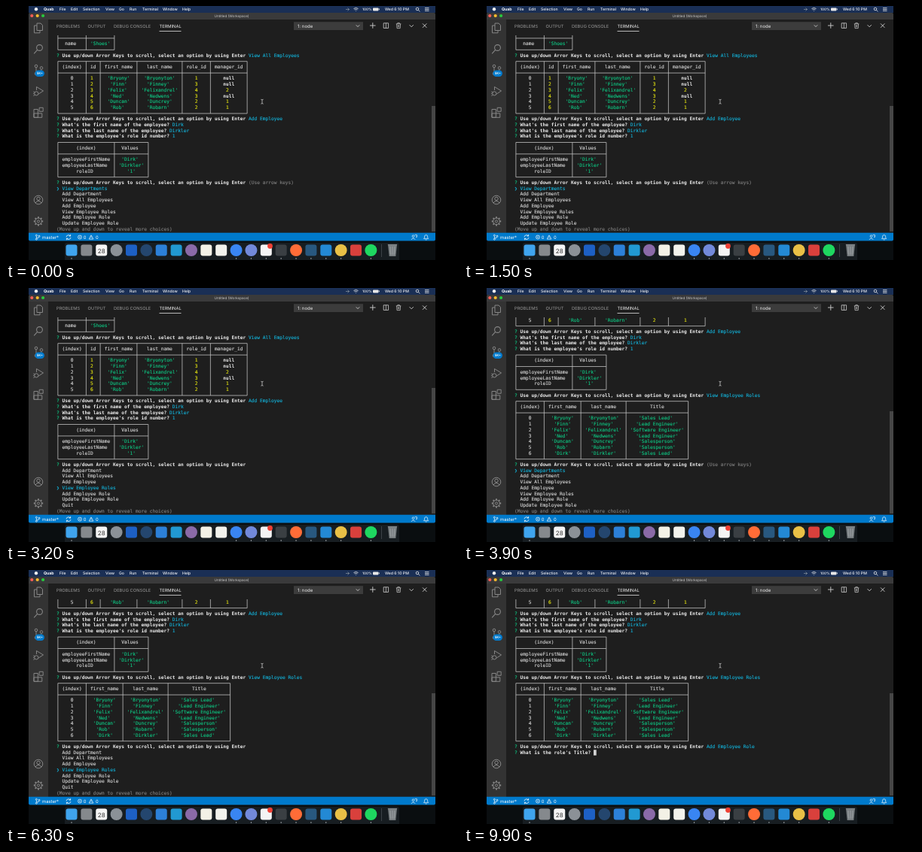
These frames come from a looping animation (600 by 338 pixels, 10000 ms). An HTML page with a canvas:

```html
<!DOCTYPE html>
<html lang="en">
<head>
<meta charset="utf-8">
<title>Employee terminal</title>
<style>
html, body { margin: 0; width: 100%; height: 100%; overflow: hidden; background: #000; }
canvas { display: block; width: 600px; height: 338px; }
</style>
</head>
<body>
<canvas id="stage" width="600" height="338"></canvas>
<script>
const ctx = document.getElementById('stage').getContext('2d');
ctx.textRendering = 'geometricPrecision';

const LOOP = 10000;
const CELL = 3.75, LINE = 7.7, LEFT = 67, FIRST_ROW = 42.9;
const MONO = '"DejaVu Sans Mono", monospace';
const SANS = 'Inter, sans-serif';
const PLAIN = '#d2d2d2', WHITE = '#ececec', GREEN = '#0fc481', CYAN = '#14aed4',
      YELLOW = '#e5e510', DIM = '#7d7d7d', ICON = '#858585';

const CHOICES = ['View Departments', 'Add Department', 'View All Employees', 'Add Employee',
  'View Employee Roles', 'Add Employee Role', 'Update Employee Role', 'Quit'];
const PAGE = 7;

const PEOPLE = [
  ['Bryony', 'Bryonyton', 1, null, 'Sales Lead'],
  ['Finn', 'Finney', 3, null, 'Lead Engineer'],
  ['Felix', 'Felixandrel', 4, 2, 'Software Engineer'],
  ['Ned', 'Nedwens', 3, null, 'Lead Engineer'],
  ['Duncan', 'Duncrey', 2, 1, 'Salesperson'],
  ['Rob', 'Robarn', 2, 1, 'Salesperson'],
  ['Dirk', 'Dirkler', 1, null, 'Sales Lead']
];
const quote = s => `'${s}'`;

const SHOES = [['(index)', 'Values'], ['name', quote('Shoes')]];
const EMPLOYEES = [['(index)', 'id', 'first_name', 'last_name', 'role_id', 'manager_id'],
  ...PEOPLE.slice(0, 6).map(([a, b, role, boss], i) => [i, i + 1, quote(a), quote(b), role, boss])];
const ANSWERS = [['(index)', 'Values'], ['employeeFirstName', quote('Dirk')],
  ['employeeLastName', quote('Dirkler')], ['roleID', quote(1)]];
const ROLES = [['(index)', 'first_name', 'last_name', 'Title'],
  ...PEOPLE.map(([a, b, , , title], i) => [i, quote(a), quote(b), quote(title)])];

// Each step: start time, menu number, and selected choice or input stage.
const STEPS = [
  { at: 0, menu: 1, pick: 0, hint: true },
  { at: 1800, menu: 1, pick: 1 },
  { at: 2000, menu: 1, pick: 2 },
  { at: 2200, menu: 1, pick: 3 },
  { at: 2400, menu: 1, pick: 4 },
  { at: 3900, menu: 2, pick: 0, hint: true },
  { at: 4800, menu: 2, pick: 1 },
  { at: 5100, menu: 2, pick: 2 },
  { at: 5600, menu: 2, pick: 3 },
  { at: 5900, menu: 2, pick: 4 },
  { at: 6900, menu: 2, pick: 5 },
  { at: 7900, menu: 2, input: 'wait' },
  { at: 8200, menu: 2, input: 'ask' }
];

function rect(x, y, w, h, color, radius = 0) {
  ctx.fillStyle = color;
  ctx.beginPath();
  ctx.roundRect(x, y, w, h, radius);
  ctx.fill();
}
function disc(x, y, r, color) {
  ctx.fillStyle = color;
  ctx.beginPath();
  ctx.arc(x, y, r, 0, 7);
  ctx.fill();
}
function stroke(d, color = ICON, width = 1) {
  ctx.strokeStyle = color;
  ctx.lineWidth = width;
  ctx.stroke(new Path2D(d));
}
const ring = (x, y, r) => `M${x + r} ${y}a${r} ${r} 0 1 0 ${-2 * r} 0a${r} ${r} 0 1 0 ${2 * r} 0`;
function label(text, x, y, size, color, weight = 400, align = 'left') {
  ctx.font = `${weight} ${size}px ${SANS}`;
  ctx.textAlign = align;
  ctx.textBaseline = 'middle';
  ctx.fillStyle = color;
  ctx.fillText(text, x, y);
}

const colX = col => LEFT + col * CELL;
const rowY = row => FIRST_ROW + row * LINE;

// Writes on the terminal grid and returns the following column.
function write(text, col, row, color = PLAIN, bold = false) {
  ctx.font = `${bold ? 'bold ' : ''}${CELL / 0.602}px ${MONO}`;
  ctx.textAlign = 'left';
  ctx.textBaseline = 'middle';
  ctx.fillStyle = ctx.strokeStyle = color;
  ctx.lineWidth = 0.15;
  [...text].forEach((ch, i) => {
    ctx.fillText(ch, colX(col + i), rowY(row));
    if (!bold) ctx.strokeText(ch, colX(col + i), rowY(row));
  });
  return col + text.length;
}
function ask(question, row, answer = '', color = CYAN) {
  write('?', 0, row, GREEN);
  const end = write(question, 2, row, WHITE, true);
  return write(answer, end + 1, row, color);
}
const menuPrompt = (row, answer, color) =>
  ask('Use up/down Arror Keys to scroll, select an option by using Enter', row, answer, color);

function cellColor(value, isIndex) {
  if (isIndex) return PLAIN;
  if (value === null) return WHITE;
  return typeof value === 'number' ? YELLOW : GREEN;
}
function table(data, top) {
  const widths = data[0].map((_, c) => 2 + Math.max(...data.map(r => String(r[c]).length)));
  const edges = [0];
  widths.forEach(w => edges.push(edges.at(-1) + w + 1));
  const bottom = top + data.length + 2;
  const mid = col => colX(col + 0.5);
  let d = '';
  for (const row of [top, top + 2, bottom]) d += `M${mid(0)} ${rowY(row)}H${mid(edges.at(-1))}`;
  for (const col of edges) d += `M${mid(col)} ${rowY(top)}V${rowY(bottom)}`;
  stroke(d, '#c8c8c8', 0.75);
  data.forEach((cells, r) => cells.forEach((value, c) => {
    const text = String(value);
    const col = edges[c] + 1 + Math.floor((widths[c] - text.length) / 2);
    const color = r ? cellColor(value, c === 0) : PLAIN;
    write(text, col, top + 1 + r + (r ? 1 : 0), color, value === null);
  }));
}
function menu(row, { pick, hint }) {
  menuPrompt(row, hint ? '(Use arrow keys)' : '', DIM);
  const first = Math.min(Math.max(pick - 3, 0), CHOICES.length - PAGE);
  for (let i = 0; i < PAGE; i++) {
    const chosen = first + i === pick;
    if (chosen) write('❯', 0, row + 1 + i, CYAN);
    write(CHOICES[first + i], 2, row + 1 + i, chosen ? CYAN : PLAIN);
  }
  write('(Move up and down to reveal more choices)', 0, row + 1 + PAGE, DIM);
}

function terminal(step) {
  const second = step.menu === 2;
  ctx.save();
  ctx.beginPath();
  ctx.rect(56, 39, 514, 262);
  ctx.clip();
  ctx.translate(0, second ? -12 * LINE : 0);
  table(SHOES, -2);
  menuPrompt(3, CHOICES[2]);
  table(EMPLOYEES, 4);
  menuPrompt(14, CHOICES[3]);
  ask("What's the first name of the employee?", 15, 'Dirk');
  ask("What's the last name of the employee?", 16, 'Dirkler');
  ask("What is the employee's role id number?", 17, '1');
  table(ANSWERS, 18);
  if (second) {
    menuPrompt(25, CHOICES[4]);
    table(ROLES, 26);
  }
  const row = second ? 37 : 25;
  if (step.input) {
    menuPrompt(row, CHOICES[5]);
    const col = step.input === 'ask' ? ask("What is the role's Title?", row + 1) : 0;
    rect(colX(col), rowY(row + 1) - 3.8, CELL, 7.4, PLAIN);
  } else {
    menu(row, step);
  }
  ctx.restore();
  const thumb = second ? 164 : 133;
  rect(565, thumb, 5, 300 - thumb, '#464646');
  stroke('M338.4 124.3Q340 124.3 340 125.2Q340 124.3 341.6 124.3M340 125V129.4M338.4 130.2Q340 130.2 340 129.2Q340 130.2 341.6 130.2', '#d8d8d8', 0.7);
}

function menuBar() {
  rect(30, 0, 540, 9, '#1a2f55');
  disc(40, 4.3, 2.2, '#eeeeee');
  label('Quab', 50, 4.6, 5.2, '#fff', 700);
  const items = { File: 71, Edit: 86, Selection: 102, View: 132, Go: 150, Run: 164, Terminal: 181, Window: 208, Help: 234 };
  for (const name in items) label(name, items[name], 4.6, 5.1, '#f6f6f6', 500);
  stroke('M451 4.5h5M453.5 2.5l2 2l-2 2', '#8d979f', 0.7);
  stroke('M461.5 3.6q3-2.6 6 0M462.6 5q1.9-1.6 3.8 0M464.2 6.4h.7', '#eee', 0.8);
  label('100%', 473, 4.6, 4.7, '#f2f2f2', 500);
  rect(487, 2.4, 7.5, 4, '#e8e8e8', 0.8);
  rect(495, 3.6, 0.8, 1.6, '#e8e8e8');
  label('Wed 6:10 PM', 503, 4.6, 5.1, '#f6f6f6', 500);
  stroke(ring(546, 4, 1.8) + 'M547.4 5.4l2 2', '#eee', 0.8);
  stroke('M556 2.6h5.5M556 4.5h5.5M556 6.4h5.5', '#eee', 0.8);
}

function windowFrame() {
  rect(30, 9, 540, 303.6, '#1e1e1e', 2);
  rect(30, 9, 540, 9, '#3a3a3b', [2, 2, 0, 0]);
  ['#ff5f57', '#febc2e', '#28c840'].forEach((c, i) => disc(34.3 + i * 7.4, 13, 2.1, c));
  label('Untitled (Workspace)', 299.5, 13.4, 4.6, '#cccccc', 400, 'center');

  const tabs = { PROBLEMS: 67, OUTPUT: 108.5, 'DEBUG CONSOLE': 143 };
  for (const name in tabs) label(name, tabs[name], 27, 5.75, '#999999');
  label('TERMINAL', 203.5, 27, 5.75, '#f0f0f0');
  rect(203.5, 33, 29, 0.8, '#e0e0e0');
  rect(382, 21.2, 92, 10.8, '#3c3c3c');
  label('1: node', 387, 27, 6, '#f0f0f0');
  const pale = '#d0d0d0';
  stroke('M464.8 25.4l2.2 2.2l2.2-2.2M535.6 25.2l2.6 2.6l2.6-2.6', pale, 0.9);
  stroke('M483 26h7.6M486.8 22.2v7.6', pale, 0.9);
  stroke('M501.2 22.8h6.4v6.6h-6.4zM504.4 22.8v6.6', pale, 0.8);
  stroke('M517.8 23.8h6.6M519.8 23.8v-1.2h2.6v1.2M518.6 24l.4 5.6h4.2l.4-5.6M520.4 25.2v3M521.8 25.2v3', pale, 0.7);
  stroke('M553 23.4l5.4 5.4M558.4 23.4l-5.4 5.4', pale, 0.9);
}

function activityBar() {
  rect(30, 18, 26, 284, '#333333');
  stroke('M41 23h5l2.5 2.5v7h-7.5zM41 26h-3.5v9.8h7.5v-3.2', ICON, 1);
  stroke(ring(44.5, 55.5, 3.9) + 'M41.6 58.4l-4.4 5', ICON, 1.1);
  stroke(ring(40, 80, 1.8) + ring(47, 82.5, 1.8) + ring(40, 90, 1.8) + 'M40 82v6M47 84.5q0 3-6 3', ICON, 1);
  rect(38.5, 85.5, 12.5, 8.5, '#007acc', 4.2);
  label('5K+', 44.8, 90, 4.4, '#fff', 600, 'center');
  stroke('M40.5 112v-4.5l9 5.5l-7 4.5' + ring(40.3, 116.4, 2.6) + 'M36.4 114l2 1M36.2 116.6h1.6M36.4 119.4l2-1', ICON, 1);
  stroke('M37 137.5h5.4v10.8h-5.4zM37 142.9h10.8v5.4h-10.8zM44.2 135.3h5v5h-5z', ICON, 1);
  stroke(ring(43, 258, 5.8) + ring(43, 256.4, 2.2) + 'M39 262q4-5 8 0', ICON, 1);
  let teeth = '';
  for (let i = 0; i < 8; i++) {
    const c = Math.cos(i * Math.PI / 4), s = Math.sin(i * Math.PI / 4);
    teeth += `M${43 + 4.2 * c} ${286.5 + 4.2 * s}L${43 + 6.2 * c} ${286.5 + 6.2 * s}`;
  }
  stroke(ring(43, 286.5, 4.3) + ring(43, 286.5, 1.6), ICON, 1);
  stroke(teeth, ICON, 1.8);
}

function statusBar() {
  ctx.save();
  ctx.translate(0, -0.7);
  rect(30, 302.5, 540, 10.8, '#007acc', [0, 0, 2, 2]);
  const y = 308.5;
  stroke(ring(40.4, 306, 1) + ring(40.4, 311, 1) + ring(44, 307, 1) + 'M40.4 307v3M44 308q0 1.5-3 1.6', '#fff', 0.7);
  label('master*', 48, y, 5.9, '#fff');
  stroke('M80 308a3 3 0 0 1 5.4-1.2M86 308.8a3 3 0 0 1-5.4 1.2M85.6 304.8v2h-2M80.4 312v-2h2', '#fff', 0.8);
  stroke(ring(98, 308.3, 2.5) + 'M97 307.3l2 2M99 307.3l-2 2', '#fff', 0.7);
  label('0', 102.8, y, 5.9, '#fff');
  stroke('M113 305.6l2.8 5.2h-5.6zM113 307.4v1.6', '#fff', 0.7);
  label('0', 119, y, 5.9, '#fff');
  stroke(ring(540.6, 307, 1.4) + 'M538 311.6q2.6-3.6 5.2 0M542.6 305.4h2.8v2.8h-1.4', '#fff', 0.7);
  stroke('M554.6 310.4q1-.8 1-3a2 2 0 0 1 4 0q0 2.2 1 3zM556.8 311.8h1.6', '#fff', 0.7);
  ctx.restore();
}

function dock() {
  rect(30, 312, 540, 26, '#0a0e10');
  rect(78, 315, 444, 25, '#171d21', [3, 3, 0, 0]);
  // Color, shape (s: square, o: circle) and running mark.
  const icons = ['#3fa4ee s.', '#85898d s', '#f4f4f4 s', '#8b9197 o', '#1d60c4 s', '#24466e o', '#2c80d8 s',
    '#2199d2 s', '#8a6aa8 o', '#f3f1e6 s', '#f2f2ec s', '#3985f2 o.', '#7289da o.', '#f4f4f4 s.', '#3a3f43 s.',
    '#ff6c37 o.', '#28587f s.', '#2389d4 s.', '#e9c046 o.', '#d9403c s', '#1ed760 o.'];
  icons.forEach((entry, i) => {
    const [color, kind] = entry.split(' ');
    const x = 87 + i * 19.87;
    if (kind[0] === 'o') disc(x, 325, 8, color);
    else rect(x - 7.5, 317.5, 15, 15, color, 3);
    if (kind[1]) disc(x, 336, 0.7, '#c9cdd0');
  });
  label('28', 126.7, 327, 8, '#333', 400, 'center');
  disc(350.5, 319.5, 3.4, '#ee4035');
  rect(498, 317, 0.6, 17, '#555c61');
  ctx.fillStyle = '#777d80';
  ctx.fill(new Path2D('M507 317.5h12l-1.7 15.5h-8.6z'));
  stroke('M506.8 317.7h12.4M510 320l.8 11M513 320v11M516 320l-.8 11', '#b6babc', 0.6);
}

function paint(step) {
  rect(0, 0, 600, 338, '#000');
  dock();
  menuBar();
  windowFrame();
  activityBar();
  terminal(step);
  statusBar();
}

const start = performance.now();
let shown = null;
function tick() {
  const time = (performance.now() - start) % LOOP;
  const step = STEPS.findLast(s => s.at <= time) || STEPS[0];
  if (step !== shown) paint(shown = step);
  requestAnimationFrame(tick);
}
tick();
</script>
</body>
</html>
```
